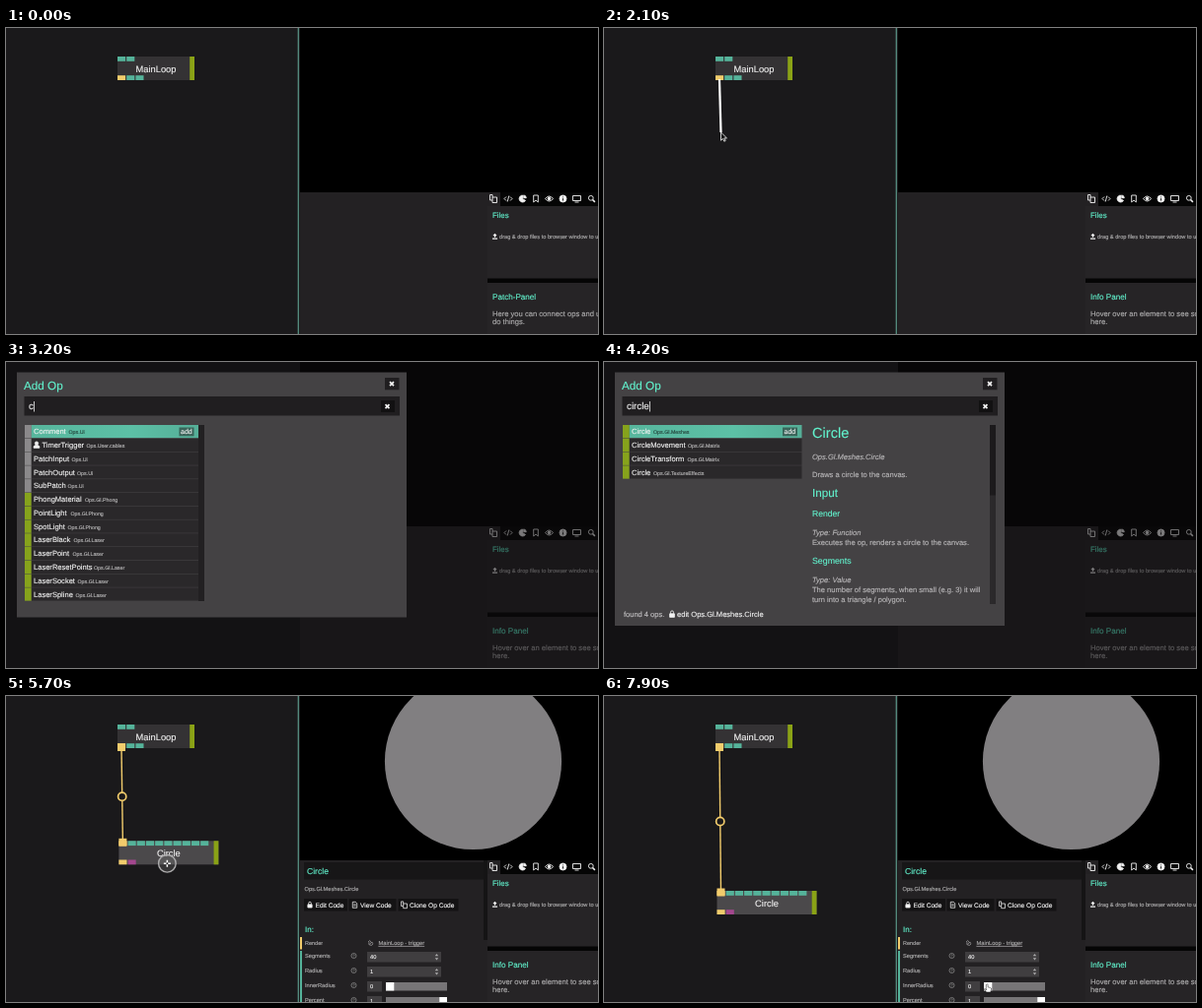
Animation of 600x311 px, one loop 8 s. Source, as an HTML page:

```html
<!DOCTYPE html>
<html lang="en">
<head>
<meta charset="utf-8">
<title>Patch editor</title>
<style>
  html, body { margin: 0; width: 100%; height: 100%; overflow: hidden; background: #1a191b; }
  svg { display: block; width: 100vw; height: 100vh; }
  text { font-family: "Liberation Sans", Arial, sans-serif; text-rendering: geometricPrecision; white-space: pre; stroke-width: .14px; }
</style>
</head>
<body>
<svg id="stage" viewBox="0 0 600 311"></svg>
<script>
const LOOP = 8000;
const C = {
  patch: '#1a191b', panel: '#232123', modal: '#444244', dark: '#201e20',
  accent: '#62f2cd', teal: '#55b39a', yellow: '#f2cc6c', green: '#8aa216',
  pink: '#a4478f', grey: '#adacad', white: '#f2f2f2'
};

const rect = (x, y, w, h, fill, more = '') =>
  `<rect x="${x}" y="${y}" width="${w}" height="${h}" fill="${fill}" ${more}/>`;
// A hairline stroke gives the letters a slightly fuller weight.
const text = (x, y, size, fill, str, more = '') =>
  `<text x="${x}" y="${y}" font-size="${size}" fill="${fill}" stroke="${fill}" ${more}>${str}</text>`;
const group = (id, body, more = '') => `<g id="${id}" ${more}>${body}</g>`;
const italic = 'font-style="italic"';

// Icons are drawn around their own centre, about 8 units wide.
const shapes = {
  copy: '<path d="M-1-1.5V-4H-3.5V1.5H-1M-1-1.5H3.5V4H-1Z"/>',
  code: '<path d="M-2-2L-4 0L-2 2M2-2L4 0L2 2M.8-3L-.8 3"/>',
  pie: '<path d="M0 0V-3.5A3.5 3.5 0 1 0 3 2Z" fill="currentColor"/><path d="M1.2-.8V-3.6A3 3 0 0 1 3.8-.8Z" fill="currentColor"/>',
  mark: '<path d="M-2.3-3.5H2.3V3.5L0 1.5L-2.3 3.5Z"/>',
  eye: '<path d="M-4 0Q0-5 4 0Q0 5-4 0Z"/><circle r="1.4" fill="currentColor"/>',
  info: '<circle r="3.5" fill="currentColor"/><path d="M0-2V-1.2M0-.3V2" stroke="#000"/>',
  screen: '<path d="M-4-3H4V2H-4ZM-2 3.5H2"/>',
  search: '<circle cx="-.7" cy="-.7" r="2.4"/><path d="M1 1L3.4 3.4" stroke-width="1.6"/>',
  lock: '<path d="M-2.5-.5H2.5V3.2H-2.5Z" fill="currentColor"/><path d="M-1.6-.5V-2A1.6 1.6 0 0 1 1.6-2V-.5"/>',
  page: '<path d="M-2.6-3.5H1L2.6-1.8V3.5H-2.6ZM-1.3-.6H1.3M-1.3 1H1.3"/>',
  cross: '<path d="M-2-2L2 2M2-2L-2 2" stroke-width="1.7"/>',
  upload: '<path d="M0 1V-2.6M-1.8-1L0-2.8L1.8-1M-3 2.4H3" stroke-width="1.4"/>',
  user: '<circle cy="-1.8" r="1.7" fill="currentColor"/><path d="M-3 3.2V1.6Q-2.5.3 0 .3T3 1.6V3.2Z" fill="currentColor"/>',
  help: '<circle r="3"/><path d="M-.9-.8Q0-2 .9-.8Q.8-.1 0 .3M0 1.2V1.7"/>',
  link: '<path d="M-3-1.5L-1-3L1-1M3 1.5L1 3L-2 2V-1M-1 1L2-1L3 1"/>'
};
const icon = (name, x, y, color = C.white, scale = 1) =>
  `<g transform="translate(${x} ${y}) scale(${scale})" fill="none" stroke="currentColor" stroke-width=".9" color="${color}">${shapes[name]}</g>`;

const ports = (y, colors, h = 5) =>
  colors.map((c, i) => rect(i * 9.2, y, 8.1, h, c)).join('');

function node(width, label, fill, ins, outs) {
  return rect(0, 0, width, 24, fill) + rect(width - 4.8, 0, 4.8, 24, C.green) +
    ports(0, ins, 4.8) + ports(19.2, outs, 4.8) +
    text(width / 2, 15.7, 9.3, C.white, label, 'text-anchor="middle"');
}

function infoBox(id, title, first, second) {
  return group(id, text(493, 275.5, 8.1, C.accent, title) +
    text(493, 292.6, 7.6, C.grey, first) + text(493, 301, 7.6, C.grey, second));
}

function sidebar() {
  const tabs = ['copy', 'code', 'pie', 'mark', 'eye', 'info', 'screen', 'search'];
  const xs = [494, 509, 523.5, 537, 550.5, 564.5, 578.5, 593.5];
  return rect(488, 167, 112, 144, '#050505') + rect(488, 167, 13, 14, C.panel) +
    tabs.map((n, i) => icon(n, xs[i], 173.5)).join('') +
    rect(488, 181, 112, 73.5, '#262426') + rect(488, 259, 112, 52, '#262426') +
    text(493, 192.6, 7.9, C.accent, 'Files') + icon('upload', 495.5, 212, C.white, .85) +
    text(500, 214.2, 5.65, C.grey, 'drag &amp; drop files to browser window to upload') +
    infoBox('patchInfo', 'Patch-Panel', 'Here you can connect ops and use', 'do things.') +
    infoBox('hoverInfo', 'Info Panel', 'Hover over an element to see some', 'here.');
}

function button(x, w, name, label) {
  return rect(x, 206, w, 12.5, '#141314') + icon(name, x + 6, 212.3, C.white, .85) +
    text(x + 11.5, 214.6, 6.6, C.white, label);
}

function params() {
  const spin = y => `<path d="M434.8 ${y - 1}l1.7-2.3l1.7 2.3zm0 2l1.7 2.3l1.7-2.3z" fill="${C.grey}"/>`;
  const row = (label, y, value, wide) =>
    text(303, y + 2, 5.7, C.grey, label) + icon('help', 352.5, y, '#8b8a8b', .85) +
    rect(366, y - 4, wide ? 75 : 15, 10.5, '#403e40') + text(369, y + 3.2, 5.7, C.white, value) +
    (wide ? spin(y + 1.2) : rect(385, y - 3, 62, 8.5, '#777577'));
  return rect(302, 169, 182, 17.5, '#171617') + rect(484, 167, 4, 81, '#151415') +
    text(305, 181, 8.6, C.accent, 'Circle') +
    text(302.5, 197.8, 5.65, C.grey, 'Ops.Gl.Meshes.Circle') +
    button(302, 44, 'lock', 'Edit Code') + button(347.5, 48, 'page', 'View Code') +
    button(397.5, 61, 'copy', 'Clone Op Code') + text(303, 240, 8, C.accent, 'In:') +
    rect(298, 245, 2, 12.5, C.yellow) + rect(298, 259, 2, 52, C.teal) +
    text(303, 253, 5.5, C.grey, 'Render') + icon('link', 369.5, 251, C.grey, .8) +
    text(377.5, 253, 5.75, C.grey, 'MainLoop - trigger', 'text-decoration="underline"') +
    row('Segments', 264, '40', true) + row('Radius', 279, '1', true) +
    row('InnerRadius', 294, '0') + rect(385, 291, 8.3, 8.5, '#fff') +
    row('Percent', 309, '1') + rect(439.3, 306, 7.7, 8.5, '#fff');
}

function list(rows, right) {
  return rows.map(([name, path, color, nameWidth, who], i) => {
    const y = 64 + i * 13.78, x = who ? 36.5 : 28;
    return rect(19, y, 6.8, 13.3, color) +
      rect(25.8, y, right - 25.8, 13.2, i ? '#2a282a' : 'url(#pick)') +
      (who ? icon('user', 31, y + 6.5, C.white, .95) : '') +
      text(x, y + 9.2, 7.55, C.white, name) +
      text(x + nameWidth + 2.5, y + 9.2, 5.3, i ? '#b9b8b9' : '#24463d', path) +
      (i ? '' : rect(right - 19.5, y + 2.5, 15, 8.8, '#3a655a') + text(right - 18, y + 9.2, 7, C.white, 'add'));
  }).join('');
}

const frame = h => rect(11, 10.5, 395, h, C.modal);

function allOps() {
  const grey = '#8b898b', green = '#86a31c';
  const user = [['Comment', 'Ops.Ui', grey, 33], ['TimerTrigger', 'Ops.User.cables', grey, 42.5, true],
    ['PatchInput', 'Ops.Ui', grey, 36], ['PatchOutput', 'Ops.Ui', grey, 41.5], ['SubPatch', 'Ops.Ui', grey, 32]];
  const gl = [['PhongMaterial', 'Phong', 49.5], ['PointLight', 'Phong', 35], ['SpotLight', 'Phong', 32],
    ['LaserBlack', 'Laser', 38], ['LaserPoint', 'Laser', 37], ['LaserResetPoints', 'Laser', 58.5],
    ['LaserSocket', 'Laser', 42], ['LaserSpline', 'Laser', 40]]
    .map(([n, p, w]) => [n, 'Ops.Gl.' + p, green, w]);
  return frame(249) + rect(195, 64, 6, 179, '#222022') + list(user.concat(gl), 195);
}

function found() {
  const green = '#86a31c', body = (y, s, more) => text(211, y, 7.55, '#b9b7b9', s, more);
  const head = (y, size, s) => text(211, y, size, C.accent, s);
  return frame(257.5) +
    list([['Circle', 'Ops.Gl.Meshes', green, 19.5], ['CircleMovement', 'Ops.Gl.Matrix', green, 54.5],
      ['CircleTransform', 'Ops.Gl.Matrix', green, 54], ['Circle', 'Ops.Gl.TextureEffects', green, 19.5]], 200.5) +
    rect(391, 64, 6, 182, '#2b292b') + rect(391, 64, 6, 71.5, '#1c1a1c') +
    head(77.3, 14.6, 'Circle') + body(99, 'Ops.Gl.Meshes.Circle', italic) +
    body(116.6, 'Draws a circle to the canvas.') + head(137, 11.7, 'Input') +
    head(157, 8.6, 'Render') + body(175.8, 'Type: Function', italic) +
    body(186, 'Executes the op, renders a circle to the canvas.') + head(205, 8.8, 'Segments') +
    body(224, 'Type: Value', italic) +
    body(234.2, 'The number of segments, when small (e.g. 3) it will') +
    body(244.4, 'turn into a triangle / polygon.') +
    text(20, 259, 7.5, '#c4c2c4', 'found 4 ops.') + icon('lock', 69, 256.3, C.white, .95) +
    text(74, 259, 7.55, C.white, 'edit Ops.Gl.Meshes.Circle');
}

function cursors() {
  const arrow = '<path d="M0 0V8.2L2 6.4L3.3 9.2L4.7 8.5L3.4 5.9H6Z" fill="#111" stroke="#fff" stroke-width=".8"/>';
  const hand = '<path d="M-2.2 2.4V-3.2Q-1.3-4.3-.4-3.2V-.6L2.3 0Q3.3.2 3 1.6L2.3 4.5H-1.9L-4.3 1.4Q-3.9.4-2.2 1.8Z" fill="#fff" stroke="#111" stroke-width=".5"/>';
  const move = `<circle r="8.8" fill="#777" fill-opacity=".3" stroke="${C.grey}" stroke-width="1.4"/>` +
    '<path d="M-3.5 0H3.5M0-3.5V3.5" stroke="#fff" stroke-width="1.5"/><circle r="1" fill="#222"/>';
  return group('arrow', arrow) + group('hand', hand) + group('move', move);
}

const T = C.teal, Y = C.yellow;
const joint = rect(-4, -4, 8, 8, Y);

document.getElementById('stage').innerHTML =
  `<defs><linearGradient id="pick"><stop stop-color="#57b69d"/><stop offset=".6" stop-color="#5cc0a6"/><stop offset="1" stop-color="#55ae97"/></linearGradient></defs>` +
  rect(0, 0, 600, 311, C.patch) + rect(298, 0, 302, 167, '#000') +
  rect(298, 167, 190, 144, C.panel) + rect(295.7, 0, 1.1, 311, '#62a594', 'id="divider"') +
  group('ball', '<circle cx="473.5" cy="66.5" r="89.6" fill="#817f81"/>') +
  group('params', params()) + sidebar() +
  group('main', node(78, 'MainLoop', '#343234', [T, T], [Y, T, T]), 'transform="translate(113 29)"') +
  group('op', node(101, 'Circle', '#4b494b', [Y, ...Array(9).fill(T)], [Y, C.pink])) +
  `<line id="wire" x1="117" y1="52"/>` +
  group('startJoint', joint, 'transform="translate(117 52)"') + group('endJoint', joint) +
  `<circle id="ring" r="4.1" fill="${C.patch}" stroke="${Y}" stroke-width="1.7"/>` +
  group('tip', rect(131, 113, 63.5, 15, '#a09ea0') +
    text(134, 122.7, 6.4, '#222', 'render', 'font-weight="bold"') + text(156.5, 122.7, 7.4, '#333', '(Function)')) +
  group('modal', rect(0, 0, 600, 311, '#0e0d0e', 'opacity=".52"') + group('all', allOps()) + group('found', found()) +
    text(18, 28.2, 11.7, C.accent, 'Add Op') + rect(384, 16, 14.5, 12.3, C.dark) + icon('cross', 391, 22.2) +
    rect(18.5, 35, 380.5, 19.5, C.dark) + rect(380, 39, 14, 12, '#121112') + icon('cross', 386.5, 45.2) +
    text(23, 48.2, 9.75, C.white, '', 'id="typed"') + rect(0, 40, .8, 10.5, C.white, 'id="caret"')) +
  cursors();

const el = id => document.getElementById(id);
const show = (id, on) => { el(id).style.display = on ? '' : 'none'; };
const put = (id, x, y) => el(id).setAttribute('transform', `translate(${x} ${y})`);
const set = (id, attrs) => { for (const k in attrs) el(id).setAttribute(k, attrs[k]); };

function along(path, t) {
  const i = path.findIndex(p => p[0] > t);
  if (i === 0) return path[0].slice(1);
  if (i < 0) return path[path.length - 1].slice(1);
  const [t0, x0, y0] = path[i - 1], [t1, x1, y1] = path[i];
  const k = (t - t0) / (t1 - t0), e = k * k * (3 - 2 * k);
  return [x0 + (x1 - x0) * e, y0 + (y1 - y0) * e];
}

const opPath = [[5300, 113, 107], [6150, 116, 195], [6200, 116, 195], [6500, 114.5, 198]];
const pointer = [[100, 42, 150], [900, 117, 50], [1800, 117, 50], [2080, 118.5, 106], [2600, 119.5, 110.5],
  [4500, 119, 108], [4800, 146.5, 104], [5000, 150, 112], [5250, 162, 130], [5300, 162, 130],
  [6150, 165, 218], [6200, 165, 218], [6500, 163.5, 221], [6700, 163.5, 221], [7700, 389.5, 296.5]];
const keys = [3100, 3300, 3450, 3600, 3750, 3900];
const OPEN = 2550, DONE = 4400;

function draw(t) {
  const modal = t >= OPEN && t < DONE, built = t >= DONE;
  const pulling = t >= 1800 && t < OPEN;
  const [x, y] = along(pointer, t), [ox, oy] = along(opPath, t);

  ['ball', 'params', 'op', 'ring', 'startJoint', 'endJoint'].forEach(id => show(id, built));
  ['divider', 'main'].forEach(id => show(id, !modal));
  const patchInfo = t < 900 || (t >= 4500 && t < 5250);
  show('patchInfo', patchInfo);
  show('hoverInfo', !patchInfo);

  show('wire', pulling || built);
  const hot = t < 5000;
  set('wire', {
    x2: built ? ox + 4 : x, y2: built ? oy + 1 : y,
    stroke: hot ? '#fff' : Y, 'stroke-width': hot ? 2.2 : 1.4
  });
  put('op', ox, oy);
  put('endJoint', ox + 4, oy + 1.5);
  put('ring', (121 + ox) / 2, (oy + 57) / 2);
  show('tip', t >= 4600 && t < 5000);

  const count = keys.filter(k => t >= k).length;
  show('modal', modal);
  show('all', count < 2);
  show('found', count >= 2);
  el('typed').textContent = 'circle'.slice(0, count);
  set('caret', { x: 23.2 + (count ? el('typed').getComputedTextLength() : 0) });
  show('caret', count > 0);

  const moving = t >= 5250 && t < 6500;
  const hand = (t >= OPEN && t < 3050) || t >= 7600;
  const visible = t >= 100 && (t < 3050 || built);
  show('move', moving);
  show('hand', hand);
  show('arrow', visible && !moving && !hand);
  ['move', 'hand', 'arrow'].forEach(id => put(id, x, y));
}

const begin = performance.now();
function tick() {
  draw((performance.now() - begin) % LOOP);
  requestAnimationFrame(tick);
}
tick();
</script>
</body>
</html>
```
